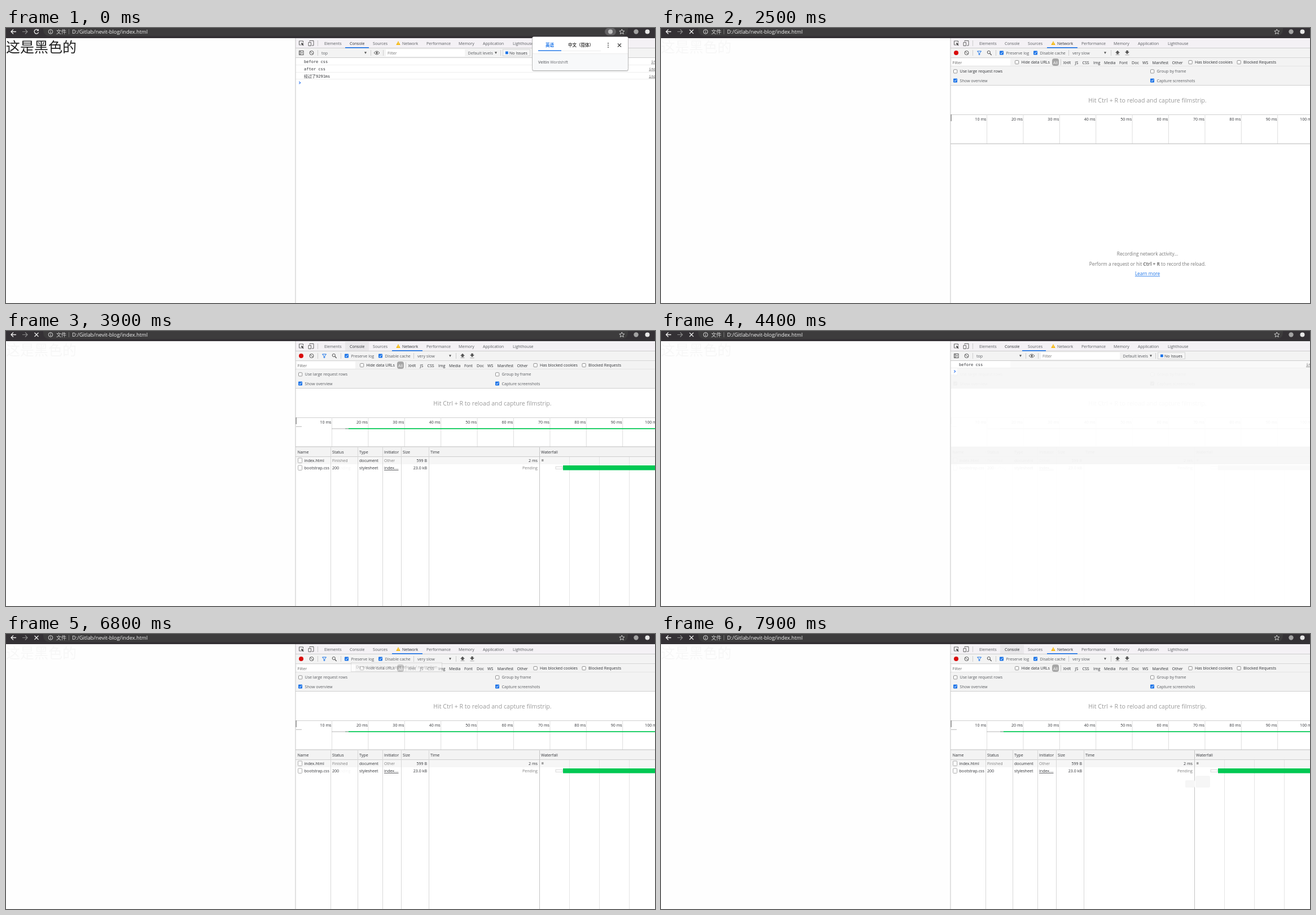
Recreate the animation shown at these times as an HTML page. Size 1150 by 487 pixels, loop 8000 ms.

```html
<!DOCTYPE html>
<html lang="zh">
<head>
<meta charset="utf-8">
<title>index.html</title>
<style>
html, body { margin: 0; width: 100%; height: 100%; overflow: hidden; background: #fff; }
svg { display: block; width: 1150px; height: 487px; }
text { font-family: "Open Sans", "Noto Sans CJK SC", sans-serif; white-space: pre; }
.mono { font-family: "DejaVu Sans Mono", "Noto Sans CJK SC", monospace; }
.ghost { opacity: .045; filter: grayscale(1); }
</style>
</head>
<body>
<svg id="stage" viewBox="0 0 1150 487" xmlns="http://www.w3.org/2000/svg"></svg>
<script>
const LOOP = 8000;
const GREY = '#5a5d61', DARK = '#303236', BLUE = '#1a73e8', BAR = '#f3f3f3', EDGE = '#cdcdcd';

const rect = (x, y, w, h, fill, more = '') =>
  `<rect x="${x}" y="${y}" width="${w}" height="${h}" fill="${fill}" ${more}/>`;
const text = (x, y, s, fill = GREY, size = 7.1, more = '') =>
  `<text x="${x}" y="${y}" fill="${fill}" font-size="${size}" ${more}>${s}</text>`;
const path = (d, color, w = 1, fill = 'none') =>
  `<path d="${d}" stroke="${color}" stroke-width="${w}" fill="${fill}"/>`;
const dot = (x, y, r, fill, more = '') => `<circle cx="${x}" cy="${y}" r="${r}" fill="${fill}" ${more}/>`;
const hline = (y, color = EDGE, x = 513) => rect(x, y, 1150 - x, 1, color);
const vline = (x, y, h, color = EDGE) => rect(x, y, 1, h, color);
const group = (id, s) => `<g id="${id}">${s}</g>`;
const END = 'text-anchor="end"', MID = 'text-anchor="middle"', UNDER = 'text-decoration="underline"';
const caret = (x, y) => path(`M${x - 2} ${y - 1.7}h4l-2 3.6z`, 'none', 0, '#555');

function check(x, y, label, on, color = GREY) {
  const box = on
    ? rect(x, y - 3.5, 7, 7, BLUE, 'rx="1"') + path(`M${x + 1.5} ${y}l1.5 1.6 2.7-3.3`, '#fff', 1)
    : rect(x + .5, y - 3, 6.2, 6.2, '#fff', 'rx="1" stroke="#777" stroke-width=".8"');
  return box + text(x + 11.5, y + 2.7, label, color);
}
const noEntry = (x, y) => dot(x, y, 3.5, 'none', 'stroke="#555"') + path(`M${x - 2.4} ${y - 2.4}l4.8 4.8`, '#555');

function browserBar() {
  return rect(0, 0, 1150, 18, '#343135') + rect(66, -14, 1036, 28, '#3d3c3d', 'rx="10"')
    + path('M18 6.5H9.5M13 2.5l-4 4 4 4', '#eee', 1.3)
    + path('M29 6.5h8.5M34 2.5l4 4-4 4', '#8a8a8a', 1.2)
    + group('reload', path('M57 4A3.8 3.8 0 1 0 57.6 7.4', '#eee', 1.3) + path('M58 1.5v3.7h-3.7z', 'none', 0, '#eee'))
    + group('stop', path('M50.5 3l7 7M57.5 3l-7 7', '#eee', 1.2))
    + dot(79, 6.5, 3.8, 'none', 'stroke="#ddd"') + path('M79 6v2.8M79 3.9v1.1', '#ddd', 1)
    + text(89, 9.7, '文件', '#ddd', 9) + vline(111, 2, 9, '#777')
    + text(117, 9.6, 'D:/Gitlab/nevit-blog/index.html', '#f2f2f2', 9.3)
    + path('M1091.3 2l1.3 3 3.2.3-2.4 2.1.7 3.2-2.8-1.7-2.8 1.7.7-3.2-2.4-2.1 3.2-.3z', '#ddd', .9)
    + dot(1116.5, 6.5, 4.2, '#a2a2a2') + dot(1136.5, 6.5, 4, '#e6e6e6');
}

const TABS = [['Elements', 564], ['Console', 609], ['Sources', 650], ['Network', 702],
  ['Performance', 745], ['Memory', 802], ['Application', 845], ['Lighthouse', 898]];

function tabBar() {
  return rect(513, 18, 637, 17, '#f4f1f5') + rect(601, 19, 42, 16, '#e9e7ea', 'id="tabHover"')
    + path('M523 30h-3.500v-7h7v3', '#555', .9) + path('M523 26l5 2-2 .9 1.700 1.800-.8.8-1.800-1.800-.8 1.800z', 'none', 0, '#444')
    + path('M538 24v-1.500h7v8.500h-3M536 25.500h4.500v6h-4.500z', '#555', .9)
    + vline(552, 22, 10)
    + path('M695 23.300l3.700 6.700h-7.400z', 'none', 0, '#f4b400') + path('M695 25.500v2.200M695 28.300v.8', '#fff', .8)
    + TABS.map(([s, x]) => text(x, 29.700, s, GREY, 7.1, `id="tab${s}"`)).join('')
    + hline(35) + rect(601, 34, 42, 1.600, BLUE, 'id="slider"');
}

function consolePanel() {
  const log = (y, s, x) => text(528, y, s, DARK, 7, 'class="mono"')
    + text(x, y, 'index.html:9', '#666', 7, `class="mono" ${UNDER}`);
  const prompt = y => path(`M519.300 ${y - 2}l2.500 2-2.500 2`, '#367cf1', 1.100);
  const haze = rect(619, 53, 531, 12, '#f9f9f9') + rect(514, 66, 636, 36, '#f7f7f7')
    + rect(514, 205, 636, 31, '#f7f7f7') + rect(514, 66, 11, 11, '#fff');
  return rect(514, 36, 636, 451, '#fff') + rect(514, 36, 636, 16, BAR) + hline(52)
    + rect(519.500, 40.500, 7.500, 7, 'none', 'stroke="#555"') + path('M521.500 40.500v7', '#555') + path('M523.500 42.300v3.400l2.200-1.700z', 'none', 0, '#555')
    + noEntry(541.500, 44) + vline(552, 39, 10) + text(559, 46.700, 'top') + caret(637, 44) + vline(646, 39, 10)
    + path('M652 44q5-6 10 0q-5 6-10 0z', '#555', .9) + dot(657, 44, 1.700, '#555') + vline(668, 39, 10)
    + rect(673, 38, 140, 12, '#fff') + text(676, 46.700, 'Filter', '#777')
    + text(818.500, 46.700, 'Default levels') + caret(868, 44) + vline(876, 39, 10)
    + rect(880.500, 38, 48, 11.500, '#f6f6f6', 'stroke="#ccc" stroke-width=".8"')
    + rect(885, 41.500, 4.800, 4.800, BLUE) + text(892, 46.700, 'No Issues', DARK)
    + group('haze', haze)
    + log(62, 'before css', 1143) + hline(65, '#efefef')
    + group('logs', log(74.700, 'after css', 1139) + hline(78, '#efefef')
      + log(87.500, '经过了9291ms', 1139) + hline(90, '#efefef') + prompt(97))
    + group('prompt', prompt(71.500));
}

function netTools() {
  const kinds = [['XHR', 712.500], ['JS', 733.500], ['CSS', 746.500], ['Img', 766], ['Media', 785], ['Font', 812],
    ['Doc', 834], ['WS', 853], ['Manifest', 870.500], ['Other', 905.500]];
  return rect(514, 36, 636, 65, BAR) + hline(52, '#d6d6d6')
    + dot(523, 44, 4, '#d90a0a') + noEntry(541.500, 44) + vline(552, 39, 10)
    + path('M560.500 41h7l-2.700 3.300v3h-1.600v-3z', BLUE, 1)
    + dot(580.800, 43, 2.600, 'none', 'stroke="#555"') + path('M582.700 45l3 3', '#555', 1.200) + vline(593, 39, 10)
    + check(600, 44, 'Preserve log', 1) + check(660, 44, 'Disable cache', 1) + vline(722, 39, 10)
    + text(729, 46.700, 'very slow') + caret(787, 44) + vline(797, 39, 10)
    + path('M809 40l3.500 3.800h-2v2.200h-3v-2.200h-2z M805.500 47.500h7', '#555', .5, '#555')
    + path('M826 46l3.500-3.500h-2v-2.500h-3v2.500h-2z M822.500 47.700h7', '#555', .5, '#555')
    + rect(515, 54, 104, 12.500, '#fff') + rect(599, 54, 20, 12.500, BAR, 'id="trim"') + text(516.500, 63.700, 'Filter', '#666')
    + check(627, 60.500, 'Hide data URLs', 0, DARK)
    + rect(693, 54, 12, 13, '#a6a6a6', 'rx="4"') + text(695, 63.500, 'All', '#fff') + vline(708, 55, 11)
    + kinds.map(([s, x]) => text(x, 63.500, s, DARK)).join('')
    + check(934.500, 60.500, 'Has blocked cookies', 0, DARK) + check(1020.500, 60.500, 'Blocked Requests', 0, DARK)
    + hline(67.500, '#d6d6d6');
}

function netBody() {
  let ticks = '';
  for (let i = 0; i < 10; i++) {
    const x = 577 + 64.400 * i;
    ticks += vline(x, 153, 52, '#dedede') + text(x - .5, 164, `${i + 1}0 ms`, DARK, 7.1, END);
  }
  const heads = [['Name', 516.500], ['Status', 578], ['Type', 626], ['Initiator', 670], ['Size', 703], ['Time', 752], ['Waterfall', 948]];
  const page = y => rect(517.500, y, 7, 8.500, '#fff', 'rx="1" stroke="#999" stroke-width=".8"');
  const hint = text(862, 402.700, 'Recording network activity…', '#777', 8.300, MID)
    + text(862, 420.500, 'Perform a request or hit <tspan font-weight="700">Ctrl + R</tspan> to record the reload.', '#777', 8.300, MID)
    + text(862, 438.300, 'Learn more', BLUE, 8.200, MID + ' ' + UNDER);
  const table = rect(514, 206, 636, 16, BAR) + hline(222) + rect(514, 223, 636, 13, '#f6f6f6')
    + [998, 1051, 1104].map(x => vline(x, 223, 264, '#e4e4e4')).join('')
    + [575, 623, 667, 700, 749].map(x => vline(x, 206, 281, '#d8d8d8')).join('') + vline(945, 206, 281, '#c4c4c4')
    + heads.map(([s, x]) => text(x, 216.700, s, DARK)).join('')
    + page(225) + page(238)
    + text(528.500, 231.700, 'index.html', DARK) + text(578, 231.700, 'Finished', '#808080') + text(626, 231.700, 'document', DARK)
    + text(670, 231.700, 'Other', '#808080') + text(746, 231.700, '599 B', DARK, 7.1, END) + text(942, 231.700, '2 ms', DARK, 7.1, END)
    + text(528.500, 245, 'bootstrap.css', DARK) + text(626, 245, 'stylesheet', DARK)
    + text(670, 245, 'index.…', DARK, 7.1, UNDER) + text(942, 245, 'Pending', '#808080', 7.1, END)
    + rect(949, 227, 3.500, 4, '#a3a3a3') + rect(974, 240.300, 12, 4, '#fff', 'stroke="#ccc" stroke-width=".8"')
    + rect(514, 168.700, 10, 1, '#b5b5b5') + rect(577, 172.500, 30, 1, '#b5b5b5')
    + group('waiting', text(578, 245, '(pending)', '#808080') + text(746, 245, '0 B', DARK, 7.1, END))
    + group('loading', text(592, 245, 'nding', '#f3f3f3', 7.1, 'id="trace"') + text(578, 245, '200', DARK)
      + text(746, 245, '23.0 kB', DARK, 7.1, END)
      + rect(987, 238, 163, 8.500, '#00c853') + rect(601, 172.300, 6, 1.300, '#8fb79f') + rect(607, 172, 543, 1.800, '#0ccb5b'));
  return rect(514, 101, 636, 386, '#fff') + rect(514, 68, 636, 33, BAR)
    + group('rows', check(518, 76.700, 'Use large request rows', 0)) + check(518, 93, 'Show overview', 1)
    + check(867, 76.700, 'Group by frame', 0) + check(867, 93, 'Capture screenshots', 1) + hline(101, '#d0d0d0')
    + text(862, 132, 'Hit Ctrl + R to reload and capture filmstrip.', '#9a9a9a', 10.650, MID)
    + hline(153, '#d0d0d0') + ticks + rect(513, 153, 2, 12, '#999')
    + group('hint', hint) + group('table', table) + hline(204.500, '#b8b8b8');
}

function popup() {
  return rect(1061, 0, 20, 13, '#626163', 'rx="6.500"') + dot(1071, 6.500, 4, '#bdbdbd')
    + rect(932, 16, 171, 61, '#000', 'rx="3" opacity=".13"') + rect(932.500, 15.500, 170, 60, '#f8f9fa', 'rx="3" stroke="#aaa" stroke-width=".8"')
    + rect(933, 16, 169, 29.500, '#fff', 'rx="2.500"') + rect(933, 45, 169, 1, '#ececec')
    + text(956, 33.300, '英语', BLUE, 7.500, 'font-weight="700"') + text(996, 33.300, '中文（简体）', '#444', 7.500, 'font-weight="600"')
    + rect(943, 40, 111, .6, '#e2e2e2') + rect(943, 39.400, 41, 1.400, BLUE)
    + [27, 30.500, 34].map(y => dot(1067, y, .9, '#444')).join('') + path('M1084 27.500l6 6M1090 27.500l-6 6', '#444', 1.200)
    + text(943, 63, '<tspan font-weight="600">Veltin</tspan> Wordshift', '#6a6d71', 7);
}

const tip = (id, x, y, w, h, s) => group(id,
  rect(x + .5, y + .5, w - 1, h - 1, '#f9f9f9', 'stroke="#bdbdbd"') + text(x + w / 2, y + h / 2 + 2.600, s, '#575757', 7.1, MID));

const stage = document.getElementById('stage');
stage.innerHTML = rect(0, 0, 1150, 487, '#fefefe')
  + text(0, 42.500, '这是黑色的', '#222', 25, 'id="title"')
  + browserBar() + group('console', consolePanel()) + group('tools', netTools()) + group('body', netBody())
  + tabBar() + vline(512.500, 18, 469, '#c4c4c4')
  + tip('tipOverview', 530, 100, 129, 16, 'Show overview of network requests')
  + tip('tipLog', 611, 50, 162, 17, 'Do not clear log on page reload / navigation')
  + tip('tipPending', 932, 253, 40, 18, 'Pending')
  + group('smudge', rect(929, 259, 17, 13, '#f6f6f6', 'rx="2"') + rect(947, 251, 26, 21, '#f6f6f6', 'rx="3"'))
  + group('popup', popup());

const $ = {};
stage.querySelectorAll('[id]').forEach(e => $[e.id] = e);
const show = (id, on) => $[id].style.display = on ? '' : 'none';
const set = (id, name, v) => $[id].setAttribute(name, v);

// value of the last [time, value] step reached
const step = (t, list) => list.reduce((v, [at, next]) => t >= at ? next : v, 0);

function draw(t) {
  const within = (a, b) => t >= a && t < b;
  const first = t < 600, second = within(4400, 5400), logView = first || second;

  set('title', 'fill', first ? '#222' : '#f7f7f7');
  set('title', 'font-weight', first ? 400 : 500);
  show('popup', first);
  show('reload', first);
  show('stop', !first);

  show('console', logView);
  show('logs', first);
  show('prompt', second);
  show('haze', second);
  show('tools', !logView);
  show('body', !first);
  $.body.setAttribute('class', second ? 'ghost' : '');
  show('hint', t < 3200);
  show('table', t >= 3200);
  show('waiting', t < 3500);
  show('loading', t >= 3500);
  show('trace', t < 7500);
  show('trim', t >= 6900);
  $.rows.querySelector('text').setAttribute('fill', within(2500, 2600) ? DARK : GREY);

  const [x, w] = step(t, [[0, [601, 42]], [600, [684, 54]], [4400, [640, 42]], [4500, [601, 42]],
    [5400, [646, 53]], [5500, [684, 54]]]);
  set('slider', 'x', x);
  set('slider', 'width', w);
  const overConsole = within(3900, 4400) || t >= 7900;
  show('tabHover', overConsole);
  set('tabConsole', 'fill', logView || overConsole ? DARK : GREY);
  set('tabSources', 'fill', within(4900, 5000) ? DARK : GREY);
  set('tabNetwork', 'fill', !logView || t >= 5000 ? DARK : GREY);

  set('tipOverview', 'opacity', step(t, [[3500, .3], [3600, 1], [3700, .5], [3800, 0]]));
  set('tipLog', 'opacity', step(t, [[6800, .4], [6900, 0]]));
  set('tipPending', 'opacity', step(t, [[7200, .4], [7300, 1], [7500, .4], [7600, 0]]));
  show('smudge', t >= 7600);
}

const begin = performance.now();
function tick() {
  draw((performance.now() - begin) % LOOP);
  requestAnimationFrame(tick);
}
tick();
</script>
</body>
</html>
```
